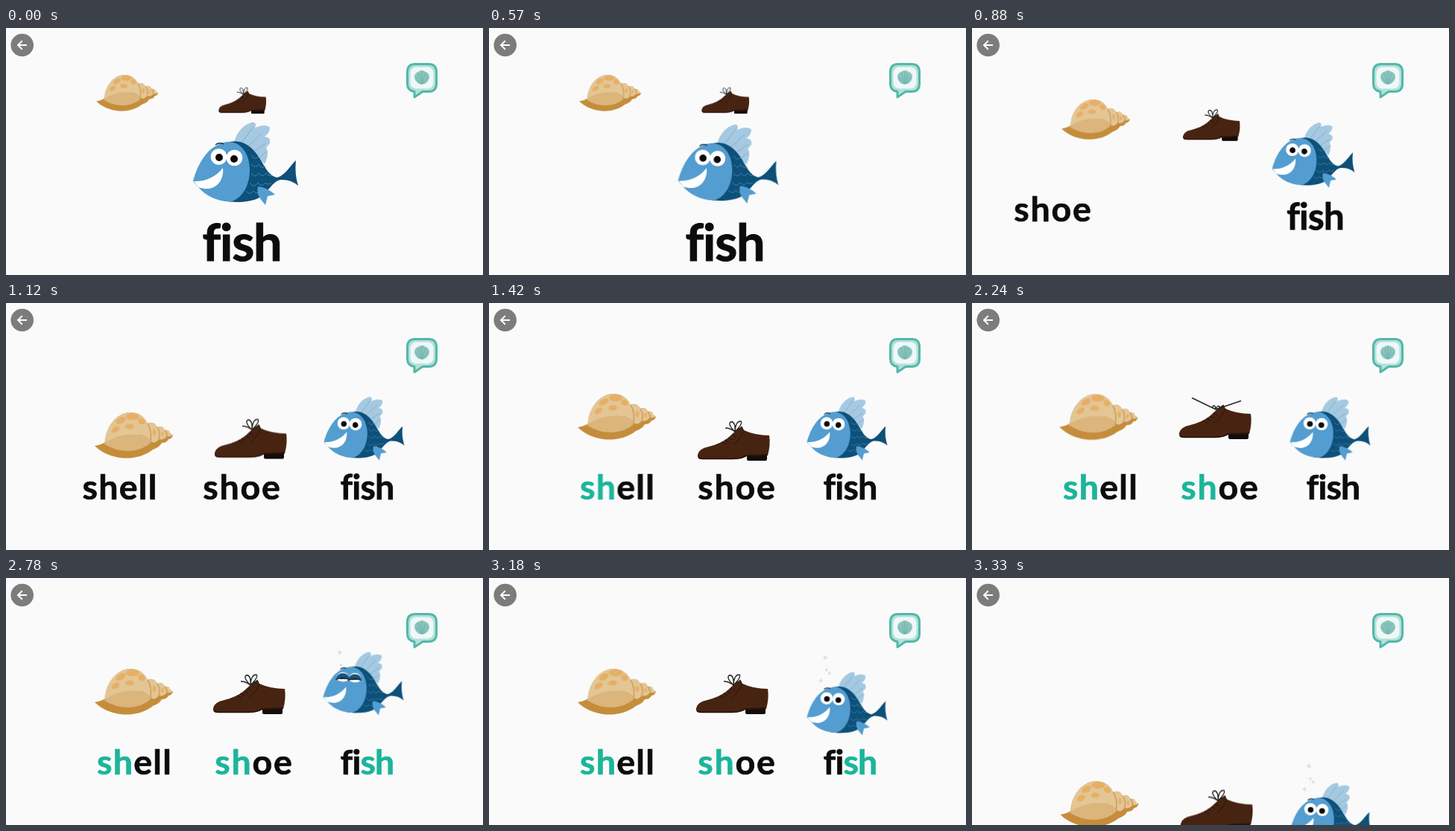
An HTML page without scripts that plays this animation: 640 by 332 pixels, repeating every 3430 ms.

```html
<!DOCTYPE html>
<html lang="en">
<head>
<meta charset="utf-8">
<title>sh words</title>
<style>
html, body { margin: 0; width: 100%; height: 100%; overflow: hidden; background: #fafafa; }
svg { display: block; width: 100vw; height: 100vh; }
text { font: 700 46.5px Lato, "Open Sans", sans-serif; font-variant-ligatures: none; text-anchor: middle; fill: #0c0c0c; stroke: #0c0c0c; stroke-width: .7px; }

/* poses are held between steps */
.move, .sh, .show { animation: 3430ms step-end infinite; }
.shell { animation-name: shell; }
.shoe { animation-name: shoe; }
.fish { animation-name: fish; }
.shell-word { animation-name: shell-word; }
.shoe-word { animation-name: shoe-word; }
.fish-word { animation-name: fish-word; }
.bubbles { animation-name: bubbles; }
.lids { animation-name: lids; }
.bow { animation-name: bow; }
.flung { animation-name: flung; }
.sh1 { animation-name: sh1; }
.sh2 { animation-name: sh2; }
.sh3 { animation-name: sh3; }

@keyframes shell {
  0% { transform: translate(162.5px, 87.5px) scale(.79); }
  25.65% { transform: translate(166px, 123px) scale(.875); }
  29.15% { transform: translate(169px, 158px) scale(.95); }
  32.65% { transform: translate(171.5px, 178px); }
  37.02% { transform: translate(171.5px, 163px); }
  41.39% { transform: translate(171.5px, 153px); }
  57.43% { transform: translate(170px, 153.5px) rotate(1deg); }
  73.17% { transform: translate(171.5px, 153px); }
  97.08%, 100% { transform: translate(171px, 304px); }
}
@keyframes shoe {
  0% { transform: translate(317px, 97px) scale(.66); }
  25.65% { transform: translate(321px, 130px) scale(.79); }
  29.15% { transform: translate(325px, 162px) scale(.92); }
  32.65% { transform: translate(328px, 182px); }
  37.02% { transform: translate(328px, 184.5px); }
  57.43% { transform: translate(327px, 168px); }
  60.93% { transform: translate(326px, 155.5px); }
  97.08%, 100% { transform: translate(328px, 311px); }
}
@keyframes fish {
  0% { transform: translate(321.5px, 182.5px); }
  4.37% { transform: translate(321px, 183px) scale(.955); }
  21.28% { transform: translate(366px, 180px) scale(.9); }
  25.65% { transform: translate(458px, 171px) scale(.785); }
  29.15% { transform: translate(475px, 169.5px) scale(.77); }
  32.65% { transform: translate(480.5px, 169px) scale(.765); }
  77.55% { transform: translate(480px, 154px) scale(.765); }
  81.04% { transform: translate(479.5px, 142px) scale(.765); }
  89.06% { transform: translate(480px, 154px) scale(.765); }
  92.71% { transform: translate(480.5px, 169px) scale(.765); }
  97.08%, 100% { transform: translate(481.5px, 318px) scale(.765); }
}
@keyframes shell-word {
  0% { transform: translate(-90px, 262px); }
  29.15% { transform: translate(83px, 262px); }
  32.65% { transform: translate(153px, 264px); }
  37.02% { transform: translate(172.5px, 264px); }
  97.08%, 100% { transform: translate(172.5px, 415px); }
}
@keyframes shoe-word {
  0% { transform: translate(-90px, 260px); }
  25.65% { transform: translate(109px, 260px); }
  29.15% { transform: translate(236px, 262px); }
  32.65% { transform: translate(317px, 264px); }
  37.02% { transform: translate(333px, 264px); }
  97.08%, 100% { transform: translate(333px, 415px); }
}
@keyframes fish-word {
  0% { transform: translate(316.5px, 313px) scale(1.47); }
  21.28% { transform: translate(360px, 300px) scale(1.34); }
  25.65% { transform: translate(460.5px, 271px) scale(1.07); }
  29.15% { transform: translate(479px, 266px) scale(1.02); }
  32.65% { transform: translate(484.5px, 264px); }
  97.08%, 100% { transform: translate(484.5px, 415px); }
}
@keyframes bubbles {
  0% { opacity: 0; }
  81.04% { opacity: 1; transform: translate(-3px, 30px); }
  85.42% { opacity: 1; transform: translate(-2px, 14px); }
  89.06% { opacity: 1; transform: translate(-1px, 8px); }
  92.71% { opacity: 1; transform: translate(0, 4px); }
  97.08%, 100% { opacity: 1; transform: none; }
}
@keyframes lids { 0%, 89.06%, 100% { opacity: 0; } 77.55% { opacity: 1; } }
@keyframes bow { 0%, 69.67%, 100% { opacity: 1; } 60.93% { opacity: 0; } }
@keyframes flung { 0%, 69.67%, 100% { opacity: 0; } 60.93% { opacity: 1; } }
@keyframes sh1 { 37.02%, 100% { fill: #1cb59a; stroke: #1cb59a; } }
@keyframes sh2 { 57.43%, 100% { fill: #1cb59a; stroke: #1cb59a; } }
@keyframes sh3 { 77.55%, 100% { fill: #1cb59a; stroke: #1cb59a; } }
</style>
</head>
<body>
<svg viewBox="0 0 640 332">
  <rect width="640" height="332" fill="#fafafa"/>

  <!-- back button -->
  <circle cx="21.7" cy="23" r="15.3" fill="#7c7c7c"/>
  <path d="M28 23H16.500M21.800 17.200L16 23l5.800 5.800" fill="none" stroke="#fff" stroke-width="2"/>

  <!-- sound bubble -->
  <g stroke-linejoin="round">
    <path d="M549 48.500h18q10.500 0 10.500 10.500v16q0 10.500-10.500 10.500h-8l-11 7.500v-7.500q-9.500-1-9.500-10.500v-16q0-10.500 10.500-10.500z" fill="#b5e0d9" stroke="#52b8a9" stroke-width="3"/>
    <rect x="542.500" y="52.500" width="31" height="29" rx="8" fill="#eff8f7"/>
    <path d="M554 75q-6-4-6-10 1-5 5-6 5-4 10 0 4 1 5 6 0 6-6 10l-4 1z" fill="#8ac4bd"/>
    <path d="M557 75l-7-9M557.500 75l-4-14M558 75V59M558.500 75l4-14M559 75l7-9" fill="none" stroke="#6bada6" stroke-width=".8"/>
  </g>

  <!-- seashell -->
  <g class="move shell">
    <g transform="translate(-171.500 -153)">
      <path d="M119 167Q127 166 133 162C133 144 147 123 166 122Q183 122 190 137Q198 133 203 142Q210 139 213 146Q219 145 220 150L224 153Q222 158 218 158Q216 163 209 163Q206 169 197 172C186 181 172 184 157 183.500Q133 181 119 167Z" fill="#c58d3b"/>
      <path d="M133 162C133 144 147 123 166 122Q183 122 190 137Q198 133 203 142Q210 139 213 146Q219 145 220 150L223 153Q220 155 216 154Q211 160 205 158Q200 165 194 161Q189 154 180 152Q153 152 138 166Z" fill="#e4c594"/>
      <path d="M131 164Q153 149 178 152Q194 154 194 163Q183 173 165 174Q146 174 131 164Z" fill="#dcb57c"/>
      <path d="M190 137Q196 146 194 161M203 142Q208 150 205 158M213 146Q217 151 216 155" fill="none" stroke="#c99a54" stroke-width="1.400"/>
      <g fill="#e5b066">
        <ellipse cx="170" cy="127.500" rx="9" ry="4.500"/>
        <ellipse cx="154" cy="133" rx="7" ry="4" transform="rotate(-30 154 133)"/>
        <ellipse cx="182" cy="134" rx="5" ry="4" transform="rotate(35 182 134)"/>
        <ellipse cx="166" cy="141" rx="6" ry="3.600"/>
        <ellipse cx="147" cy="145" rx="6" ry="3.600" transform="rotate(-35 147 145)"/>
        <ellipse cx="199" cy="149" rx="2.200" ry="4"/>
        <ellipse cx="210" cy="151" rx="1.600" ry="3"/>
      </g>
    </g>
  </g>

  <!-- shoe -->
  <g class="move shoe">
    <g transform="translate(-328 -184.500)">
      <path d="M346 203h27v7q0 2-2 2h-23q-2 0-2-2z" fill="#120c0a"/>
      <path d="M280 204Q281 196 295 193Q311 189 321 181L334 169L339.500 165.500L342 171Q357 178 376 178Q378 190 374 205L346 206Q340 210 328 210H284Q279 209 280 204Z" fill="#472411"/>
      <path d="M281 207.500q2 2 6 2h41q10 0 17-4.500l29-1" fill="none" stroke="#23110a" stroke-width="1.400"/>
      <path d="M342 171q-5 12-14 19M312 187l6 3M316 184l6 3M321 181l6 3M326 177l6 3" fill="none" stroke="#25130b" stroke-width="1"/>
      <g fill="none" stroke="#252525" stroke-width="1.400">
        <path class="show bow" d="M330 173Q319 162 325 159.500Q331 160 330 173Q331 158 338 159Q341 162 330 173Q324 168 317 168M330 173Q336 168 340 171"/>
        <path class="show flung" d="M329 172L297 156.500M329 172L363 160.500M329 172q-6-2-3-5 3 0 3 5 2-6 5-4 0 4-5 4"/>
      </g>
    </g>
  </g>

  <!-- fish -->
  <g class="move fish">
    <g class="show bubbles" fill="#dfe8ec" stroke="#c3d2da" stroke-width=".8">
      <circle cx="-38.500" cy="-85" r="2.600"/>
      <circle cx="-36" cy="-63" r="1.800"/>
      <circle cx="-31" cy="-57.500" r="2"/>
      <circle cx="-46" cy="-44.500" r="2.400"/>
    </g>
    <g transform="translate(-321.500 -182.500)">
      <path d="M306 153Q313 131 331 126.500Q337 127 334 134Q349 128 354 134Q354 141 347 146Q356 147 354 155L349 161Q354 168 347 183Q330 165 306 153Z" fill="#a6c9e2"/>
      <path d="M317 153l15-20M326 158l18-17M334 165l15-10M341 173l9-7" fill="none" stroke="#7fabc9" stroke-width="1"/>
      <path d="M300 153C322 148 336 166 345 183C350 192 356 200 364 201C376 197 380 186 389 178Q387 196 392 212Q382 203 368 204C356 207 352 222 338 229C325 235 305 235 290 232Z" fill="#0d5079"/>
      <path d="M329 171q4 7 10 2M329 183q6 7 10 0 4 7 9 3M329 195q5 8 10 0 5 7 10 0 4 5 8 3M327 208q6 8 11 0 5 7 10 0 4 4 8 0M322 219q5 7 10 0 5 6 10 0" fill="none" stroke="#3f83ad" stroke-width="1"/>
      <path d="M251 206C257 182 272 156 297 153C313 152 326 166 327 188C328 210 318 228 303 233C285 234 268 226 258 214Z" fill="#539dd0"/>
      <path d="M252 206C266 207 281 201 291 188C293 206 280 222 258 214Z" fill="#fff"/>
      <path d="M338 213Q350 214 361 224L351 226L348 238L340 228Q336 221 338 213Z" fill="#539dd0"/>
      <path d="M281 157q5-4 11-1" fill="none" stroke="#17344a" stroke-width="1.600"/>
      <circle cx="285.500" cy="173" r="10.800" fill="#fff"/>
      <circle cx="306.500" cy="174.500" r="10.800" fill="#fff"/>
      <circle cx="286" cy="174" r="5" fill="#0b0b0b"/>
      <circle cx="306" cy="176" r="5" fill="#0b0b0b"/>
      <g class="show lids">
        <path d="M274 176h23v10h-23zM295 177h23v10h-23z" fill="#539dd0"/>
        <path id="lid" d="M274 174a11.500 10 0 0 1 23 0q-11-3-23 0z" fill="#1a567c"/>
        <path d="M276 176q10 6 20 0q-10-4-20 0z" fill="#fff"/>
        <path d="M273 175q12-5 24 0" fill="none" stroke="#12283a" stroke-width="2.200"/>
        <use href="#lid" x="21" y="1.500"/>
        <path d="M297 177.500q10 6 20 0q-10-4-20 0z" fill="#fff"/>
        <path d="M294 176.500q12-5 24 0" fill="none" stroke="#12283a" stroke-width="2.200"/>
      </g>
    </g>
  </g>

  <!-- words -->
  <g class="move shell-word"><text letter-spacing="1.300"><tspan class="sh sh1">sh</tspan>ell</text></g>
  <g class="move shoe-word"><text letter-spacing="1.800"><tspan class="sh sh2">sh</tspan>oe</text></g>
  <g class="move fish-word"><text letter-spacing="-.8">fi<tspan class="sh sh3">sh</tspan></text></g>
</svg>
</body>
</html>
```
